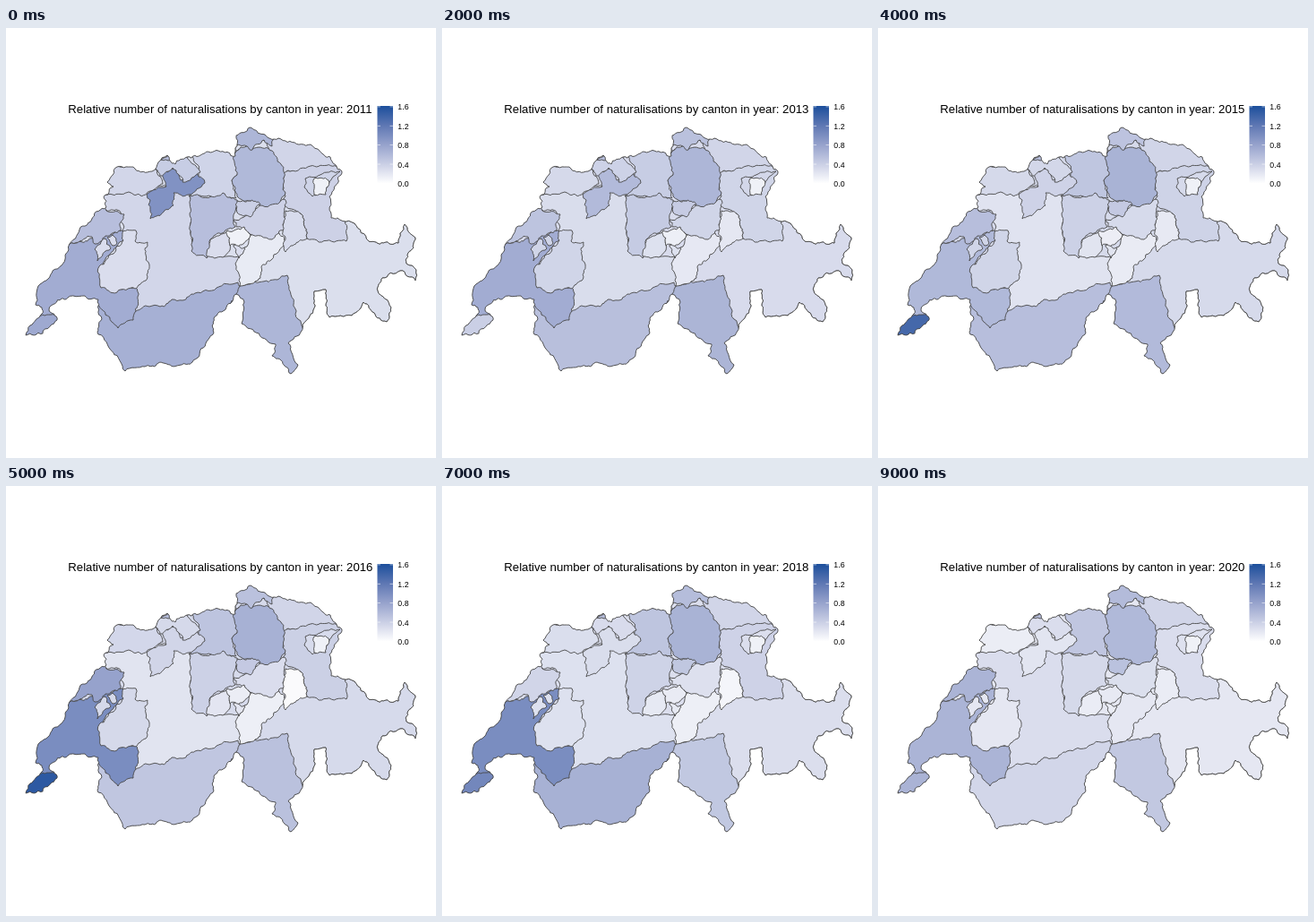
An HTML page with a canvas that plays this animation: 480x480 px, repeating every 10 s.

```html
<!DOCTYPE html>
<html lang="en">
<head>
<meta charset="utf-8">
<style>
html, body { margin: 0; width: 100%; height: 100%; overflow: hidden; background: #fff; }
canvas { display: block; }
</style>
</head>
<body>
<canvas id="stage" width="480" height="480"></canvas>
<script>
const ctx = document.getElementById('stage').getContext('2d');
const FONT = '"Liberation Sans", Arial, sans-serif';
const FIRST_YEAR = 2011, YEARS = 10, YEAR_MS = 1000, MAX_RATE = 160;
const RAMP = ['#ffffff', '#cacfe5', '#96a2cc', '#5e77b3', '#1c4f9c'];
const cantons = [];

function rateColor(rate) {
  const pos = rate / MAX_RATE * (RAMP.length - 1);
  const i = Math.floor(pos);
  const channels = hex => hex.match(/\w\w/g).map(c => parseInt(c, 16));
  const low = channels(RAMP[i]), high = channels(RAMP[i + 1]);
  return `rgb(${low.map((c, k) => Math.round(c + (high[k] - c) * (pos - i)))})`;
}

// Repeatable noise in -1..1, the same for both directions of an edge.
function noise(a, b) {
  const n = Math.sin((a[0] + b[0]) * 12.9898 + (a[1] + b[1]) * 78.233) * 43758.5453;
  return (n - Math.floor(n)) * 2 - 1;
}

// Breaks an edge into a slightly ragged line.
function roughEdge(path, a, b) {
  const dx = b[0] - a[0], dy = b[1] - a[1], length = Math.hypot(dx, dy);
  if (length < 3.5) return path.lineTo(...b);
  const side = dx > 0 || (dx === 0 && dy > 0) ? 1 : -1;
  const k = noise(a, b) * Math.min(0.22, 2 / length) * side;
  const mid = [(a[0] + b[0]) / 2 - dy * k, (a[1] + b[1]) / 2 + dx * k];
  roughEdge(path, a, mid);
  roughEdge(path, mid, b);
}

function region(outline) {
  const path = new Path2D();
  for (const ring of outline.split('/')) {
    const points = ring.trim().split(' ').map(p => p.split(',').map(Number));
    path.moveTo(...points[0]);
    points.forEach((p, i) => roughEdge(path, p, points[(i + 1) % points.length]));
    path.closePath();
  }
  return path;
}

const country = region('22,343 27,332 40,319 40,312 33,309 36,288 66,258 70,243 82,225 112,200 110,187 120,177 113,172 124,155 144,157 163,160 180,142 189,152 202,144 237,137 256,143 257,120 272,111 299,124 340,130 362,144 375,160 361,188 363,212 389,218 405,238 438,240 445,219 457,234 447,263 458,270 457,282 440,271 420,279 415,293 430,312 425,328 399,306 386,321 361,323 357,292 344,294 343,315 330,338 315,352 326,376 318,386 297,366 301,353 263,330 266,306 257,297 232,324 232,340 208,373 155,378 133,383 103,342 107,325 103,303 88,299 62,302 48,314 57,326 41,341');

// Rates in hundredths, spread evenly over the years and interpolated.
// Cantons are clipped to the country; later ones cover earlier ones.
function canton(outline, ...rates) {
  cantons.push({ path: outline ? region(outline) : country, rates });
}

function rateInYear(rates, year) {
  const pos = year / (YEARS - 1) * (rates.length - 1);
  const i = Math.floor(pos);
  return rates[i] + ((rates[i + 1] ?? rates[i]) - rates[i]) * (pos - i);
}

// Graubuenden, the rest of the country below all others
canton('', 27, 31, 31, 20);
// Bern
canton('100,200 108,186 172,176 205,180 210,250 262,256 262,288 200,312 140,320 128,206', 34, 22, 28);
// Jura
canton('100,150 165,155 175,174 150,187 137,183 105,189', 34, 31, 34, 15);
// Vaud
canton('68,243 98,234 130,226 131,237 118,250 108,264 125,292 144,289 147,300 142,327 125,336 20,330 20,280', 71, 71, 71, 71, 60, 100, 100, 100, 85, 64);
// Neuchatel
canton('60,245 100,190 112,204 132,208 128,226 111,232 99,241 96,233', 55, 52, 50, 52, 55, 80, 57, 35, 47, 64);
// Fribourg
canton('145,226 144,238 158,239 156,253 160,264 156,282 144,291 124,295 106,290 104,266 120,252 131,237 130,228 / 99,247 111,235 117,246 102,260 / 113,234 119,231 124,240 119,243', 28, 39, 28, 20);
// Geneva
canton('10,350 32,322 50,320 70,322 60,350', 74, 57, 40, 40, 135, 150, 128, 105, 115, 65);
// Valais
canton('145,316 160,311 172,311 185,303 197,304 211,296 235,290 259,284 270,320 200,400 90,400 100,303 125,335 142,326', 68, 68, 54, 54, 55, 48, 67, 67, 45, 34);
// Aargau
canton('200,135 262,135 258,164 252,170 257,190 229,188 208,188 204,181 220,172 213,152', 36, 50, 48);
// Lucerne
canton('204,187 229,188 242,184 258,192 254,214 256,222 228,236 224,257 207,249 206,230 205,207', 55, 38, 39, 32);
// Solothurn
canton('172,163 189,156 195,170 214,163 222,173 204,186 187,184 187,198 161,213 161,192 157,186 179,177', 95, 40, 32, 22);
// Basel-Landschaft
canton('160,152 200,140 217,161 197,172 186,156 172,165', 42, 32, 28);
// Basel-Stadt
canton('173,147 192,138 187,149', 55);
// St Gallen
canton('308,161 380,145 380,238 336,235 330,208 306,198 312,188', 38, 34, 42, 28);
// Ticino
canton('257,297 263,287 303,281 314,276 326,325 340,345 330,400 240,330', 62, 64, 47, 46);
// Uri
canton('256,263 269,244 273,231 305,229 314,241 296,259 285,267 281,282 261,288', 17, 20, 10, 20);
// Glarus
canton('312,204 330,208 336,235 312,250 308,223', 30, 25, 20, 19, 18, 4, 6, 8, 46, 16);
// Schwyz
canton('254,214 275,206 293,193 311,191 309,226 297,236 272,230 257,222', 38, 34, 25, 27);
// Thurgau
canton('287,125 380,120 376,154 340,154 317,160 304,163', 35);
// Zurich
canton('254,143 262,133 297,137 307,152 312,184 306,194 283,198 258,188 252,170 258,164', 60, 64, 68, 60);
// Schaffhausen
canton('250,130 262,100 305,115 297,132 288,125 275,136', 62, 48, 55, 58);
// Zug
canton('258,193 284,197 273,211 258,206', 40, 45, 45, 52);
// Obwalden
canton('224,255 228,236 247,226 250,248 242,256 / 254,242 267,246 260,257', 28, 22, 16);
// Nidwalden
canton('247,226 266,222 273,231 265,241 250,243', 12, 18);
// Appenzell Ausserrhoden
canton('333,178 334,168 373,160 356,180 342,188', 36, 25);
// Appenzell Innerrhoden
canton('344,168 360,170 357,186 344,186', 12);

function drawMap(year) {
  ctx.strokeStyle = '#484848';
  ctx.lineWidth = 0.9;
  ctx.lineJoin = 'round';
  ctx.save();
  ctx.clip(country);
  for (const { path, rates } of cantons) {
    ctx.fillStyle = rateColor(rateInYear(rates, year));
    ctx.fill(path);
    ctx.stroke(path);
  }
  ctx.restore();
  ctx.stroke(country);
}

function drawLegend() {
  const x = 414.5, top = 87, height = 86.5, width = 17.5;
  const gradient = ctx.createLinearGradient(0, top + height, 0, top);
  RAMP.forEach((color, i) => gradient.addColorStop(i / (RAMP.length - 1), color));
  ctx.fillStyle = gradient;
  ctx.fillRect(x, top, width, height);
  ctx.font = `8.8px ${FONT}`;
  for (let i = 0; i < RAMP.length; i++) {
    const y = top + height - i * (height - 1) / 4;
    ctx.fillStyle = 'rgba(255,255,255,.7)';
    ctx.fillRect(x, y - 0.5, 3.5, 0.8);
    ctx.fillRect(x + width - 3.5, y - 0.5, 3.5, 0.8);
    ctx.fillStyle = '#000';
    ctx.fillText((i * 0.4).toFixed(1), 437.3, y + 3.4);
  }
}

function draw() {
  const year = Math.floor(performance.now() / YEAR_MS) % YEARS;
  ctx.fillStyle = '#fff';
  ctx.fillRect(0, 0, 480, 480);
  drawMap(year);
  drawLegend();
  ctx.fillStyle = '#000';
  ctx.font = `13.2px ${FONT}`;
  ctx.fillText(`Relative number of naturalisations by canton in year: ${FIRST_YEAR + year}`, 69.3, 95);
  requestAnimationFrame(draw);
}
draw();
</script>
</body>
</html>
```
